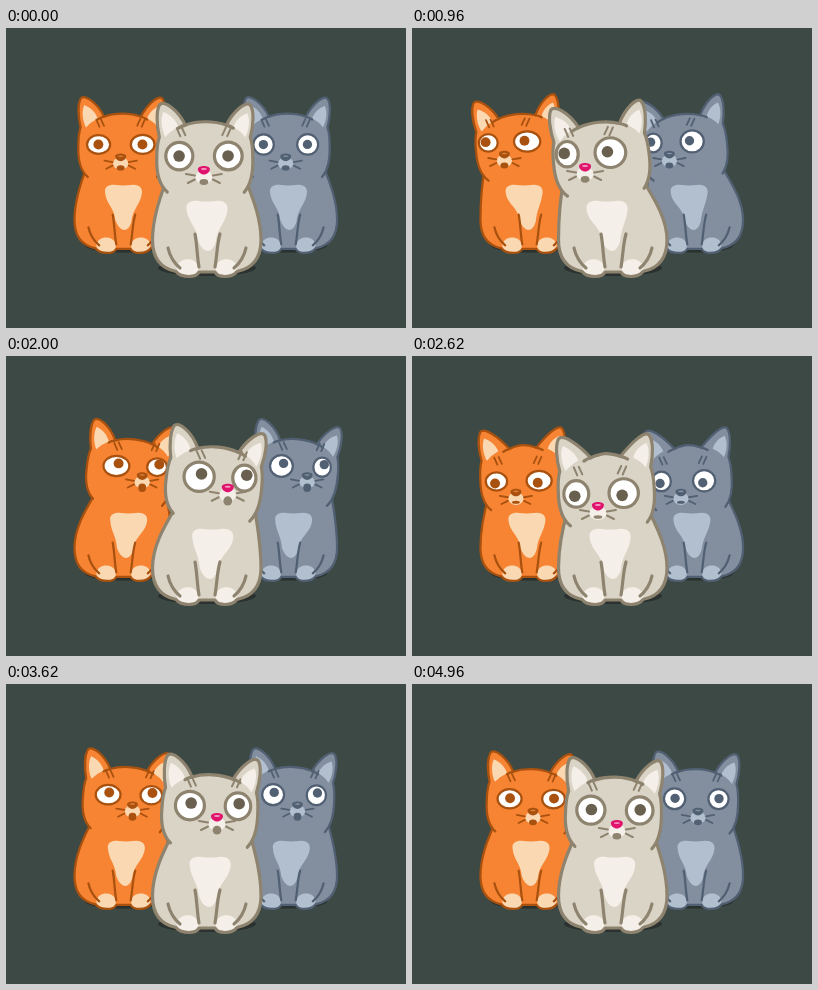
Animation, 400 px wide and 300 px high, one loop 5 s. Source, as an HTML page with a canvas:

```html
<!DOCTYPE html>
<html lang="en">
<head>
<meta charset="utf-8">
<title>Three curious cats</title>
<style>
html, body { margin: 0; width: 100%; height: 100%; overflow: hidden; background: #3d4945; }
canvas { display: block; width: 400px; height: 300px; }
</style>
</head>
<body>
<canvas id="stage" width="400" height="300"></canvas>
<script>
const ctx = document.getElementById('stage').getContext('2d');
const LOOP = 5000;

// gaze keys: time, sideways turn, downward tilt
const gaze = [
  [0, -2, 0], [180, -22, -3], [380, -27, 2], [580, -26, 7], [900, -27, -3],
  [1370, -23, -3], [1520, -17, -5], [1640, -5, -8], [1880, 24, -12], [2050, 20, -9],
  [2200, 4, -1], [2400, -4, 4], [2620, -14, 8], [2740, -25, 9], [2840, -22, 9],
  [3000, 2, 10], [3190, 24, 6], [3320, 20, -4], [3450, 14, -12], [3620, 11, -9],
  [3950, 23, -10], [4150, 21, -10], [4370, 9, -7], [4600, 18, -9], [4800, 18, -8],
  [4900, 13, -5], [4960, 5, -2]
];

const cats = [
  { x: 117.5, base: 224.5, size: .9, shade: 43, line: 2.5, eyeW: .95, eyeH: .76, pupil: 5.5,
    fur: '#f68433', edge: '#a9510f', iris: '#a9510f', pale: '#f9d8b2', nose: '#a9510f', shine: '#dc8136' },
  { x: 282.5, base: 224.5, size: .9, shade: 43, line: 2.5, eyeW: .84, eyeH: .82, pupil: 5.2,
    fur: '#838f9f', edge: '#526074', iris: '#526074', pale: '#b2bfcf', nose: '#526074', shine: '#8493a6' },
  { x: 201, base: 248, size: 1, shade: 49, line: 3.2, eyeW: 1, eyeH: 1, pupil: 5.8,
    fur: '#dad4c7', edge: '#8e836e', iris: '#6a604f', pale: '#f4f0e9', nose: '#e0146c', shine: '#f79cc3' }
];

const earLining = new Path2D(
  'M158 84C166 87 171 93 173 99Q165 103 160 109C156 101 155 91 158 84Z' +
  'M242 85C234 88 230 93 228 99Q236 103 240 109C244 101 245 92 242 85Z');
const paws = new Path2D(
  'M171 239C173 229 188 229 192 237C194 244 190 248.5 183 248.5C176 248 170 244 171 239Z' +
  'M210 237C214 229 229 229 231 239C231 244 226 248 219 248.5C212 248.5 208 244 210 237Z');
const legLines = new Path2D(
  'M162 220C164 229 168 235 174 240M240 220C238 229 234 235 228 240' +
  'M189 206C191 216 191 228 193 239M214 206C211 216 211 228 209 239');

function sample(t, k) {
  const n = gaze.length;
  const at = i => {
    const p = gaze[(i + n) % n];
    return [p[0] + (i < 0 ? -LOOP : i >= n ? LOOP : 0), p[k]];
  };
  let i = n - 1;
  while (gaze[i][0] > t) i--;
  const [a, b, c, d] = [at(i - 1), at(i), at(i + 1), at(i + 2)];
  const slope = (p, q) => (q[1] - p[1]) / (q[0] - p[0]);
  const tangent = (l, r) => l * r <= 0 ? 0 : 2 * l * r / (l + r);
  const mid = slope(b, c), w = c[0] - b[0], s = (t - b[0]) / w;
  const m0 = tangent(slope(a, b), mid) * w, m1 = tangent(mid, slope(c, d)) * w;
  const s2 = s * s, s3 = s2 * s;
  return (2 * s3 - 3 * s2 + 1) * b[1] + (s3 - 2 * s2 + s) * m0 +
         (3 * s2 - 2 * s3) * c[1] + (s3 - s2) * m1;
}

function oval(x, y, rx, ry, fill, edge) {
  ctx.beginPath();
  ctx.ellipse(x, y, rx, ry, 0, 0, Math.PI * 2);
  ctx.fillStyle = fill;
  ctx.fill();
  if (edge) ctx.stroke();
}

function line(x1, y1, x2, y2) {
  ctx.beginPath();
  ctx.moveTo(x1, y1);
  ctx.lineTo(x2, y2);
  ctx.stroke();
}

function fill(path, color) {
  ctx.fillStyle = color;
  ctx.fill(path);
}

function drawBody(cat, u) {
  const n = u * .35, c = u * .24, d = u * .08;
  const body = new Path2D(
    `M${161 + n} 153C${154 + n * .6} 170 146.5 190 146.5 212C146.5 229 153 240 170 243.5` +
    `Q174 248.5 183 248.5Q191 248.5 193 244L209 244Q211 248.5 219 248.5Q227 248.5 231 243.5` +
    `C248 240 255 229 255 212C255 190 ${247 + n * .6} 170 ${241 + n} 153`);
  oval(201, 240, cat.shade, 8, '#2a312e');
  fill(body, cat.fur);
  fill(new Path2D(
    `M${181 + c} 181C${180 + c} 174 ${187 + c} 172 ${193 + c} 173Q${201 + c} 174 ${210 + c} 173` +
    `C${217 + c} 172 ${223 + c} 175 ${222 + c} 182C${220 + c} 196 ${212 + d} 198 ${210 + d} 214` +
    `Q${207 + d} 223 ${202 + d} 223Q${196 + d} 223 ${192 + d} 212` +
    `C${191 + d} 198 ${182 + c} 194 ${181 + c} 181Z`), cat.pale);
  fill(paws, cat.pale);
  ctx.stroke(body);
  ctx.stroke(legLines);
}

function drawHead(cat, u, v) {
  // ears slide inwards when the head tips down
  const b = Math.max(v, 0) * .7, l = 180 + b, r = 221 - b;
  const head = new Path2D(
    'M162 164C154 157 151 145 151.5 130C151.5 122 152 115 154 109' +
    `C151 96 151 83 154 77C158 71 173 82 ${l} 97C${l + 12} 92.5 ${r - 12} 92.5 ${r} 97` +
    `C228 83 241 72 245 77C249 83 248 97 245 109C247 115 247.5 122 247.5 130C248 145 245 157 239 164`);
  const brow = new Path2D(`M${l} 97Q${l - 4} 98 ${l - 7} 100M${r} 97Q${r + 4} 98 ${r + 7} 100`);
  ctx.save();
  ctx.translate(200 + u * .34, 140 + v * .4 + Math.abs(u) * .06);
  ctx.rotate(.0042 * (u + 2.5));
  ctx.translate(-200, -140);
  fill(head, cat.fur);
  fill(earLining, cat.pale);
  ctx.stroke(head);
  ctx.stroke(brow);
  ctx.restore();
}

function drawEye(cat, side, u, v) {
  const x = 199.5 + side * 24.5 + .79 * u - (.002 + side * .004) * u * u;
  const y = 128 + .95 * v + .03 * v * v + side * .03 * u;
  const rx = 13.7 - side * .08 * u - .0007 * u * u;
  const ry = 13.8 - side * .04 * u;
  oval(x, y, rx * cat.eyeW, ry * cat.eyeH, '#fff', true);
  oval(x + .11 * u, y + .28 * v, cat.pupil, cat.pupil, cat.iris);
  ctx.save();
  ctx.lineWidth = 2;
  const top = y - 27 + Math.abs(u) * .1;
  line(x + side * 2.5, top - 1, x - side, top + 7);
  line(x - side * 2.5, top - 1.5, x - side * 6, top + 6);
  ctx.restore();
}

function drawMuzzle(cat, u, v) {
  const x = 200 + u, y = 142 + v;
  oval(x, y + 7, 8.5, 7, cat.pale);
  oval(x, y + 12 - v * .12, 4.4, Math.max(1.8, 2.9 - v * .17), cat.edge);
  ctx.save();
  ctx.lineWidth = 2;
  for (const s of [-1, 1]) {
    line(x + s * 9, y + 5.5, x + s * 18, y + 4);
    line(x + s * 9, y + 9.5, x + s * 16, y + 13);
  }
  ctx.restore();
  fill(new Path2D(
    `M${x - 6} ${y - 1}C${x - 6} ${y - 5} ${x + 6} ${y - 5} ${x + 6} ${y - 1}` +
    `C${x + 6} ${y + 2} ${x + 3} ${y + 4.5} ${x} ${y + 4.5}` +
    `C${x - 3} ${y + 4.5} ${x - 6} ${y + 2} ${x - 6} ${y - 1}Z`), cat.nose);
  oval(x, y - 1, 3, .9, cat.shine);
}

function drawCat(cat, u, v) {
  ctx.save();
  ctx.translate(cat.x, cat.base);
  ctx.scale(cat.size, cat.size);
  ctx.translate(-201, -248);
  ctx.strokeStyle = cat.edge;
  ctx.lineWidth = cat.line;
  ctx.lineCap = ctx.lineJoin = 'round';
  drawBody(cat, u);
  drawHead(cat, u, v);
  drawEye(cat, -1, u, v);
  drawEye(cat, 1, u, v);
  drawMuzzle(cat, u, v);
  ctx.restore();
}

function frame() {
  const t = performance.now() % LOOP;
  const u = sample(t, 1), v = sample(t, 2);
  ctx.fillStyle = '#3d4945';
  ctx.fillRect(0, 0, 400, 300);
  for (const cat of cats) drawCat(cat, u, v);
  requestAnimationFrame(frame);
}
frame();
</script>
</body>
</html>
```
